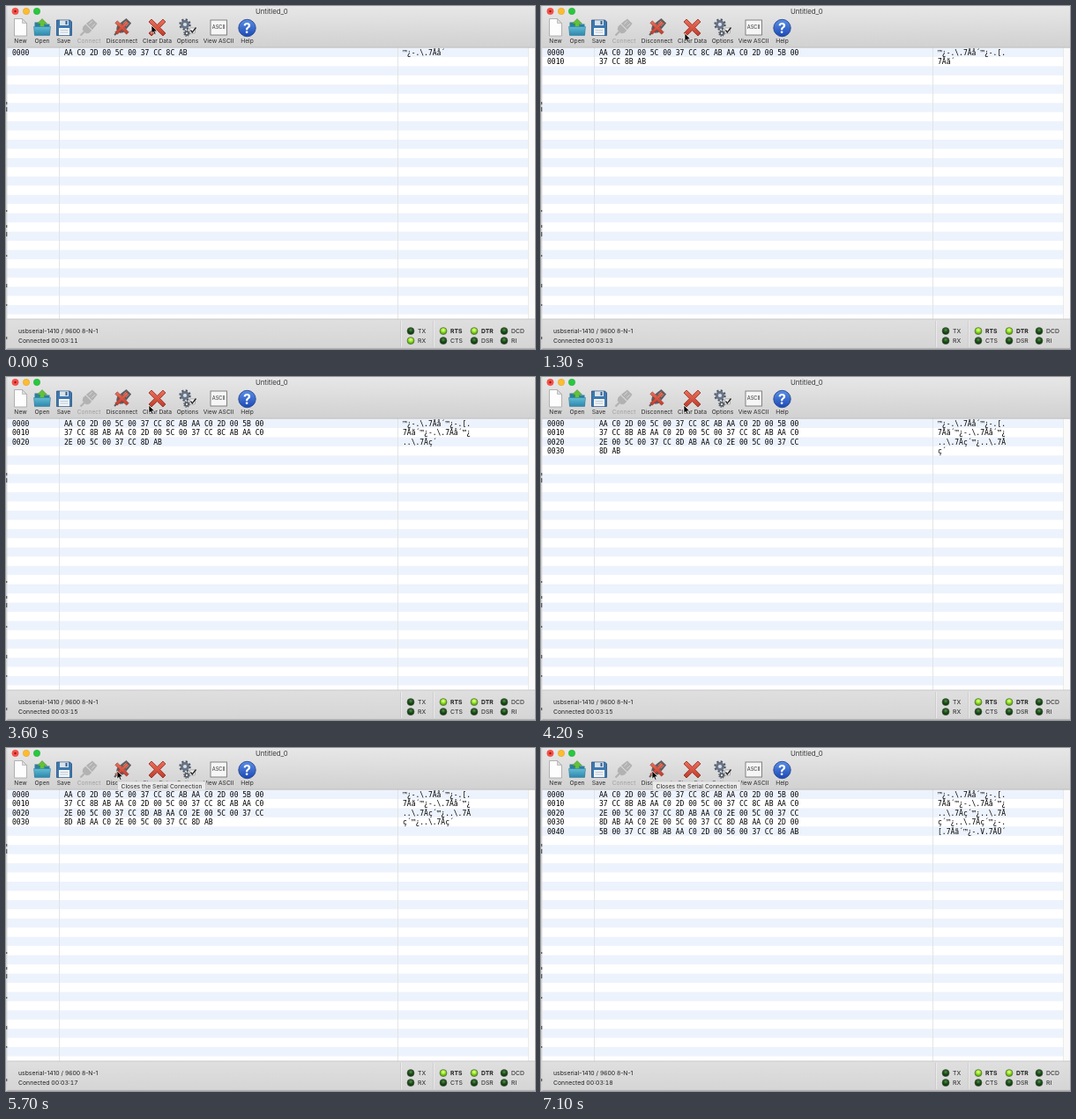
An HTML page that plays this animation: 600 by 390 pixels, repeating every 7200 ms.

```html
<!DOCTYPE html>
<html lang="en">
<head>
<meta charset="utf-8">
<title>Serial terminal</title>
<style>
  html, body { margin: 0; width: 100%; height: 100%; overflow: hidden; background: #fff; }
  svg { display: block; }
  text { font: 6.7px Inter, sans-serif; fill: #2b2b2b; }
  .mid { text-anchor: middle; }
  #rows text { font: 8px "DejaVu Sans Mono", monospace; fill: #000; }
  #status text { font-size: 6.85px; fill: #222; }
  #status .on { font-weight: 700; }
  #clock { font-variant-numeric: tabular-nums; }
</style>
</head>
<body>
<svg width="600" height="390" viewBox="0 0 600 390">
  <defs>
    <linearGradient id="bar" x2="0" y2="1"><stop stop-color="#e8e7e8"/><stop offset="1" stop-color="#d2d1d2"/></linearGradient>
    <linearGradient id="foot" x2="0" y2="1"><stop stop-color="#e0dfe0"/><stop offset="1" stop-color="#d6d5d6"/></linearGradient>
    <linearGradient id="red" x2="0" y2="1"><stop stop-color="#ec705a"/><stop offset="1" stop-color="#c03b2b"/></linearGradient>
    <linearGradient id="blue" x2="0" y2="1"><stop stop-color="#5b8fe6"/><stop offset="1" stop-color="#1c49b4"/></linearGradient>
    <linearGradient id="teal" x2="0" y2="1"><stop stop-color="#62bcd6"/><stop offset="1" stop-color="#2c87ab"/></linearGradient>
    <radialGradient id="lit" cy=".35"><stop stop-color="#efffb0"/><stop offset=".5" stop-color="#a2ee2c"/><stop offset="1" stop-color="#5fae12"/></radialGradient>
    <radialGradient id="dark" cy=".35"><stop stop-color="#5c8d58"/><stop offset=".5" stop-color="#24591f"/><stop offset="1" stop-color="#0d3a0c"/></radialGradient>
    <path id="cross" d="M-9.5-6.5-6.5-9.5 0-3.2 6.5-9.5 9.5-6.5 3.2 0 9.5 6.5 6.5 9.5 0 3.2-6.5 9.5-9.5 6.5-3.2 0Z" fill="url(#red)" stroke="#8f2b1e" stroke-width=".8" stroke-linejoin="round"/>
    <g id="plug" transform="rotate(45)">
      <path d="M0 5V12" stroke="currentColor" stroke-width="2.2"/>
      <path d="M-4-11H4L5-2H-5ZM-5-1H5V3L3 6H-3L-5 3Z" fill="currentColor"/>
      <path d="M-2-9V-4M2-9V-4" stroke="#ddd" stroke-width=".8"/>
    </g>
  </defs>

  <rect width="600" height="390" fill="#fff"/>
  <g id="stripes" fill="#edf3fd"/>
  <path d="M60.5 47V356M444.5 47V356" stroke="#dfe1e4" stroke-width=".9"/>
  <rect x="592.5" y="47" width="8" height="309" fill="#fafafa"/>
  <path d="M592.5 47V356" stroke="#e6e6e6" stroke-width=".8"/>
  <g id="rows"></g>

  <rect width="600" height="47" fill="url(#bar)"/>
  <path d="M0 47.2H600" stroke="#b4b3b4" stroke-width=".8"/>
  <g stroke-width=".5">
    <circle cx="10.5" cy="6" r="3.7" fill="#fc5048" stroke="#df4643"/>
    <circle cx="10.5" cy="6" r="1.2" fill="#8e1a14"/>
    <circle cx="23" cy="6" r="3.7" fill="#fdbc2e" stroke="#dd9d28"/>
    <circle cx="35" cy="6" r="3.7" fill="#29c83f" stroke="#1fa932"/>
  </g>
  <text class="mid" x="301.3" y="9" style="font-size:7.8px;fill:#3c3c3c">Untitled_0</text>

  <g id="labels"></g>

  <!-- New -->
  <path d="M9.5 14.5H18.5L23.5 19.5V34H9.5Z" fill="#fdfdfd" stroke="#a3a3a3" stroke-width=".8"/>
  <path d="M18.5 14.5V19.5H23.5Z" fill="#dcdcdc" stroke="#a3a3a3" stroke-width=".6"/>
  <!-- Open -->
  <path d="M32.5 33V18.5H38L40 20.5H49.5V33Z" fill="#2c7f9f"/>
  <path d="M38.5 26V20H35.5L41 14.5 46.5 20H43.5V26Z" fill="#63c13c" stroke="#3d8d25" stroke-width=".5"/>
  <path d="M31.5 23.5H50.5L49.5 33.5H32.5Z" fill="url(#teal)" stroke="#2a7796" stroke-width=".5"/>
  <!-- Save -->
  <path d="M57.5 16H72.5L74.5 18V33.5H57.5Z" fill="#3d78ae" stroke="#28517c" stroke-width=".8"/>
  <path d="M61 16.3H71V22H61Z" fill="#d9e2ea"/>
  <path d="M67.5 17H69.5V21H67.5Z" fill="#345f8c"/>
  <path d="M60 25H72V33.2H60Z" fill="#f4f6f8"/>
  <path d="M61.5 27.5H70.5M61.5 30H70.5" stroke="#9fb3c6" stroke-width=".7"/>
  <!-- Connect, Disconnect, Clear Data -->
  <g transform="translate(93 25)" color="#b2b2b2"><use href="#plug"/></g>
  <g transform="translate(131.5 24.5)" color="#5c5e61"><use href="#plug"/><use href="#cross" transform="scale(.8)"/></g>
  <use href="#cross" x="171.5" y="24.5"/>
  <!-- Options -->
  <g fill="none" stroke="#4d5762">
    <circle cx="203" cy="21" r="3.6" stroke="#66758a" stroke-width="3"/>
    <circle cx="203" cy="21" r="5.7" stroke-width="2" stroke-dasharray="2.2 2.28"/>
    <circle cx="205" cy="31" r="2" stroke-width="1.6"/>
    <circle cx="205" cy="31" r="3.2" stroke-width="1.2" stroke-dasharray="1.3 1.21"/>
  </g>
  <rect x="208.5" y="25" width="6" height="6" rx="1" fill="#f4f4f4" stroke="#858585" stroke-width=".6"/>
  <path d="M209.5 27.5 211.3 30 215.5 24.5" fill="none" stroke="#222" stroke-width="1.3"/>
  <!-- View ASCII -->
  <rect x="232" y="16" width="18.5" height="17" fill="#f6f6f6" stroke="#777" stroke-width=".9"/>
  <text class="mid" x="241.2" y="26.3" style="font-size:5.7px">ASCII</text>
  <!-- Help -->
  <circle cx="273.5" cy="25" r="9.7" fill="url(#blue)" stroke="#23458f" stroke-width=".9"/>
  <text class="mid" x="273.5" y="30.7" style="font-size:16px;font-weight:700;fill:#fff">?</text>

  <g id="status">
    <rect y="356" width="600" height="34" fill="url(#foot)"/>
    <path d="M0 356H600" stroke="#c0bfc0" stroke-width=".8"/>
    <path d="M447.5 358V388M484.5 358V388" stroke="#c4c3c4" stroke-width=".7"/>
    <path d="M448.4 358V388M485.4 358V388" stroke="#f1f0f1" stroke-width=".8"/>
    <path d="M0 389.4H600" stroke="#aaa" stroke-width=".9"/>
    <text x="14" y="372">usbserial-1410 / 9600 8-N-1</text>
    <text id="clock" x="14" y="383"></text>
  </g>

  <rect width="1.4" height="390" fill="#d2d2d2"/>
  <path d="M.7 109V112M.7 115V120M.7 232V234M.7 249V252M.7 257V262M.7 283V285M.7 316V320M.7 339V341M.7 376V379" stroke="#555" stroke-width="1.2"/>

  <g id="tip">
    <rect x="126.5" y="38" width="100" height="10" fill="#ebeaeb" stroke="#c2c2c2" stroke-width=".6"/>
    <text class="mid" x="176.5" y="45.6" style="font-size:6.75px">Closes the Serial Connection</text>
  </g>
  <path id="cursor" d="M0 0V9.3L2.1 7.3 3.6 10.6 5.1 9.9 3.7 6.7H6.6Z" fill="#000" stroke="#fff" stroke-width=".7"/>
</svg>
<script>
const LOOP = 7200, STEP = 100, TOP = 47.5, PITCH = 10.45;
const $ = id => document.getElementById(id);

function add(parent, tag, attrs, text = '') {
  const el = document.createElementNS('http://www.w3.org/2000/svg', tag);
  for (const key in attrs) el.setAttribute(key, attrs[key]);
  el.textContent = text;
  return parent.appendChild(el);
}

// Each packet: AA C0 <b> 00 <c> 00 37 CC <checksum> AB
const packets = ['2D 5C 8C', '2D 5B 8B', '2D 5C 8C', '2E 5C 8D', '2E 5C 8D', '2E 5C 8D', '2D 5B 8B', '2D 56 86'];
const arrivals = [0, 900, 1900, 3000, 3900, 5000, 6000, 6900];
const bytes = packets.flatMap(p => {
  const [b, c, sum] = p.split(' ');
  return ['AA', 'C0', b, '00', c, '00', '37', 'CC', sum, 'AB'];
});
const macRoman = { AA: '™', C0: '¿', CC: 'Ã', AB: '´', '00': '.', '8B': 'ã', '8C': 'å', '8D': 'ç', '86': 'Ü' };
const glyph = hex => macRoman[hex] || String.fromCharCode(parseInt(hex, 16));

const ticks = [400, 1300, 2400, 3400, 4400, 5400, 6400];
const path = [[0, 165, 22], [200, 163, 31], [1700, 163, 31], [1800, 162, 32], [4300, 162, 32],
  [4700, 138, 28], [5000, 138, 28], [5300, 126, 26]];

for (let i = 0; i < 30; i += 2)
  add($('stripes'), 'rect', { y: TOP + i * PITCH, width: 593, height: PITCH });

const rows = Array.from({ length: 5 }, (_, i) =>
  [7, 66, 450].map(x => add($('rows'), 'text', { x, y: TOP + 8.3 + i * PITCH })));

[['New', 16.5], ['Open', 41], ['Save', 65.5], ['Connect', 94], ['Disconnect', 131.5], ['Clear Data', 171.5],
 ['Options', 206], ['View ASCII', 241], ['Help', 273.5]].forEach(([name, x]) =>
  add($('labels'), 'text', { x, y: 42.4, class: 'mid', style: name === 'Connect' ? 'fill:#a0a0a0' : '' }, name));

const lamps = {};
[['TX', 'RX', 459], ['RTS', 'CTS', 496], ['DTR', 'DSR', 531], ['DCD', 'RI', 565]].forEach(([top, bottom, x]) =>
  [top, bottom].forEach((name, i) => {
    const on = name === 'RTS' || name === 'DTR', cy = 369.6 + i * 11;
    lamps[name] = add($('status'), 'circle',
      { cx: x, cy, r: 4, fill: on ? 'url(#lit)' : 'url(#dark)', stroke: '#4c5a48', 'stroke-width': .6 });
    add($('status'), 'text', { x: x + 8, y: cy + 2.5, class: on ? 'on' : '' }, name);
  }));

function pointer(t) {
  const i = path.findIndex(p => p[0] > t);
  if (i < 0) return path.at(-1).slice(1);
  const [t0, x0, y0] = path[i - 1], [t1, x1, y1] = path[i], k = (t - t0) / (t1 - t0);
  return [x0 + (x1 - x0) * k, y0 + (y1 - y0) * k];
}

function draw(now) {
  const t = Math.floor(now % LOOP / STEP) * STEP;
  const received = arrivals.filter(a => a <= t);
  const data = bytes.slice(0, received.length * 10);

  rows.forEach(([offset, hex, ascii], i) => {
    const line = data.slice(i * 16, i * 16 + 16);
    offset.textContent = line.length ? `00${i}0` : '';
    hex.textContent = line.join(' ');
    ascii.textContent = line.map(glyph).join('');
  });

  lamps.RX.setAttribute('fill', t - received.at(-1) < 200 ? 'url(#lit)' : 'url(#dark)');
  $('clock').textContent = `Connected 00:03:${11 + ticks.filter(k => k <= t).length}`;
  $('cursor').setAttribute('transform', `translate(${pointer(t)})`);
  $('tip').style.display = t >= 5500 ? '' : 'none';
}

function frame() {
  draw(performance.now());
  requestAnimationFrame(frame);
}
frame();
</script>
</body>
</html>
```
